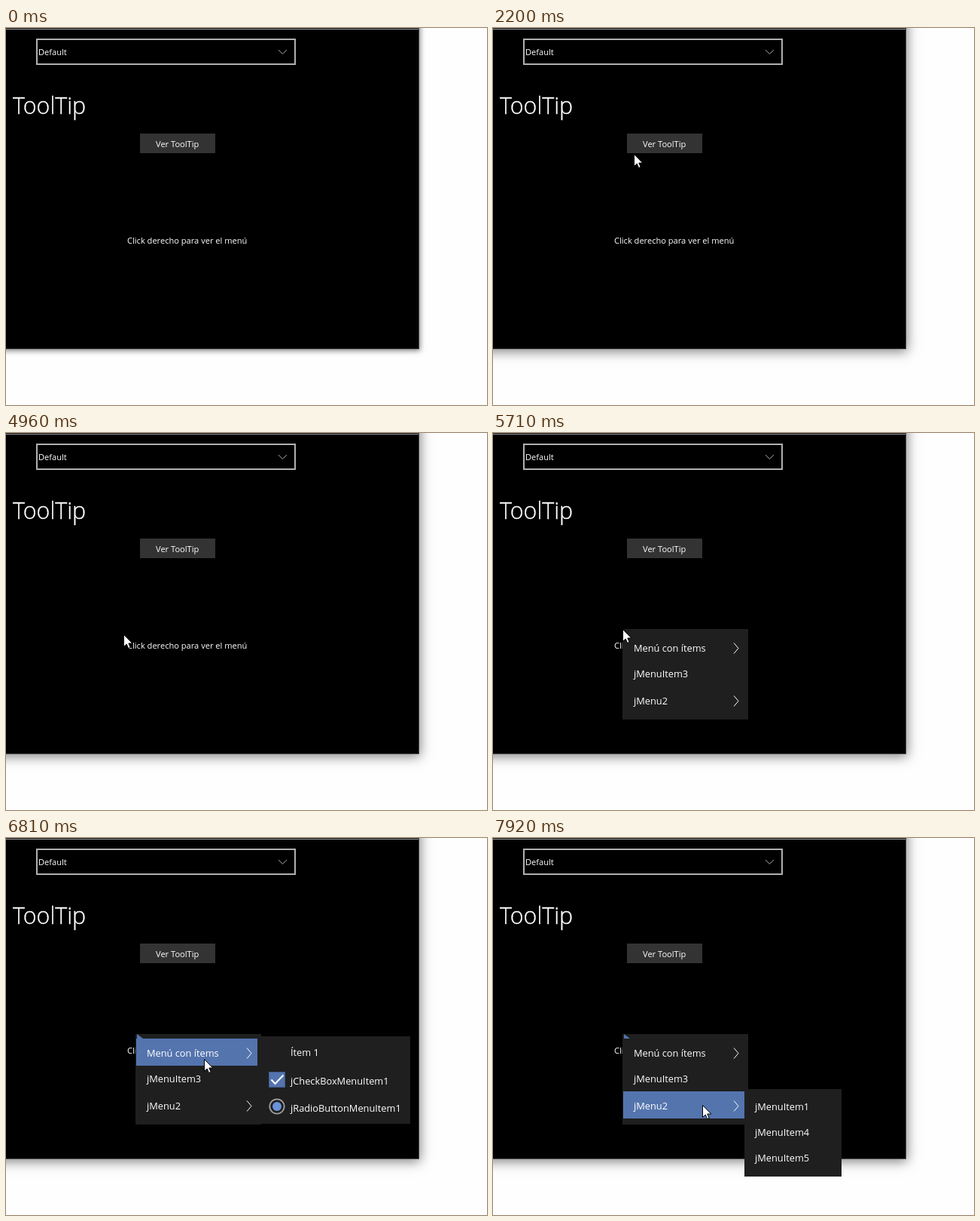
Write an HTML page that moves like this. It is 639x500 px and loops after 8 s.

```html
<!DOCTYPE html>
<html lang="es">
<head>
<meta charset="utf-8">
<title>ToolTip</title>
<style>
  html, body { margin: 0; width: 100%; height: 100%; overflow: hidden; background: #fefefe; }
  #win {
    position: absolute; left: -60px; top: -60px; width: 608px; height: 485px;
    background: #000; border: solid #454545; border-width: 0 1px 1px 0;
    box-shadow: 0 1px 7px 1px rgba(0, 0, 0, .5);
  }
  #win.active { box-shadow: 0 2px 15px 1px rgba(0, 0, 0, .5); }
  svg { position: absolute; left: 0; top: 0; }
  text { font: 11.1px "Open Sans", "Noto Sans", sans-serif; fill: #fff; }
  .menu text { font-size: 12.8px; }
  .menu > rect { fill: #1f1f1f; }
  .menu > .hot, .hot { fill: #5474ae; }
  .title { font-size: 30.4px; font-weight: 300; stroke: #fff; stroke-width: .35; }
  .line { fill: none; stroke: #fff; }
</style>
</head>
<body>
<div id="win"></div>
<svg width="639" height="500" viewBox="0 0 639 500">
  <path d="M0 1.5H548" stroke="#a6a6a6"/>
  <rect x="41" y="15" width="343" height="33" fill="#000" stroke="#b0b0b0" stroke-width="2"/>
  <text x="43" y="36">Default</text>
  <path class="line" d="M362 29l5.500 5.500 5.500-5.500" style="stroke:#a0a0a0"/>
  <text class="title" x="9" y="114">ToolTip</text>
  <rect x="178" y="140" width="100" height="26" fill="#333"/>
  <rect id="ring" x="179" y="141" width="98" height="24" fill="none" stroke="#858585" stroke-width="2"/>
  <text x="199" y="158">Ver ToolTip</text>
  <text x="161" y="286">Click derecho para ver el menú</text>

  <g id="tip">
    <rect x="199" y="182" width="182" height="26" fill="#2b2b2b" stroke="#222" stroke-width="2"/>
    <text x="206" y="199">Prueba de texto para un tooltip</text>
  </g>

  <g id="main" class="menu">
    <rect x="172" y="260" width="167" height="120"/>
    <path id="corner" class="hot" d="M174 260v6h8z"/>
    <rect id="row" class="hot" x="173" width="161" height="36"/>
    <text x="187" y="290">Menú con ítems</text>
    <text x="187" y="324">jMenuItem3</text>
    <text x="187" y="360">jMenu2</text>
    <path class="line" d="M320 278.500l6 7-6 7M320 348.500l6 7-6 7"/>
  </g>

  <g id="sub1" class="menu">
    <rect x="334" y="263" width="203" height="116"/>
    <rect class="hot" x="349.500" y="310.500" width="21" height="20" stroke="#415a8c"/>
    <path class="line" d="M352.500 320.500l5 5.500 11-11.500" stroke-width="2"/>
    <circle cx="360" cy="356" r="9.700" fill="none" stroke="#a0a0a0" stroke-width="1.800"/>
    <circle cx="360" cy="356" r="6" fill="#6a92da"/>
    <text x="378" y="289">Ítem 1</text>
    <text x="378" y="327">jCheckBoxMenuItem1</text>
    <text x="378" y="363">jRadioButtonMenuItem1</text>
  </g>

  <g id="sub2" class="menu">
    <rect x="334" y="333" width="129" height="116"/>
    <text x="348" y="361">jMenuItem1</text>
    <text x="348" y="395">jMenuItem4</text>
    <text x="348" y="429">jMenuItem5</text>
  </g>

  <path id="cursor" d="M.5 .500v16l3.700-3.500 2.400 5.500 2.600-1.100-2.400-5.400h5z" fill="#fff" stroke="#000"/>
</svg>
<script>
const LOOP = 8000;
const STEP = 71; // time between pointer updates

// Each pointer move starts where the last one ended; bow bends its path sideways.
const entry = { x: 124, y: 492 };
const moves = [
  { at: 200, steps: 11, x: 90, y: 251 },
  { at: 1290, steps: 6, x: 96, y: 243, bow: 2 },
  { at: 1920, steps: 6, x: 198, y: 158 },
  { at: 3130, steps: 1, x: 198, y: 159 },
  { at: 4540, steps: 6, x: 156, y: 267, bow: 25 },
  { at: 5160, steps: 3, x: 160, y: 250 },
  { at: 5380, steps: 3, x: 172, y: 260 },
  { at: 5910, steps: 11, x: 260, y: 286 },
  { at: 6740, steps: 2, x: 263, y: 293 },
  { at: 7080, steps: 10, x: 277, y: 354 },
  { at: 7920, steps: 1, x: 278, y: 354 }
];

const $ = id => document.getElementById(id);
const show = (id, on) => { $(id).style.display = on ? "" : "none"; };
const easeOut = p => p * (2 - p);

function pointer(t) {
  const i = moves.filter(m => t >= m.at).length - 1;
  if (i < 0) return null;
  const from = moves[i - 1] || entry;
  const { at, steps, x, y, bow = 0 } = moves[i];
  const p = easeOut(Math.min(1, (Math.floor((t - at) / STEP) + 1) / steps));
  const dx = x - from.x, dy = y - from.y;
  const side = bow * Math.sin(Math.PI * p) / Math.hypot(dx, dy);
  return [
    Math.round(from.x + dx * p - dy * side),
    Math.round(from.y + dy * p + dx * side)
  ];
}

function draw(t) {
  const pos = pointer(t);
  const [x, y] = pos || [0, 0];
  const hover = x >= 178 && x < 278 && y >= 140 && y < 166;
  const open = t >= 5710;
  const row = open ? Math.floor((y - 266) / 35) : -1;

  $("win").classList.toggle("active", t >= 200);
  $("cursor").setAttribute("transform", `translate(${x} ${y})`);
  $("row").setAttribute("y", 266 + 35 * row);
  show("cursor", pos);
  show("ring", hover);
  show("tip", hover && t >= 3060);
  show("main", open);
  show("row", row >= 0);
  show("corner", row >= 0);
  show("sub1", row === 0 && t >= 6260);
  show("sub2", row === 2 && t >= 7600);
}

const origin = performance.now();
function tick() {
  draw((performance.now() - origin) % LOOP);
  requestAnimationFrame(tick);
}
tick();
</script>
</body>
</html>
```
